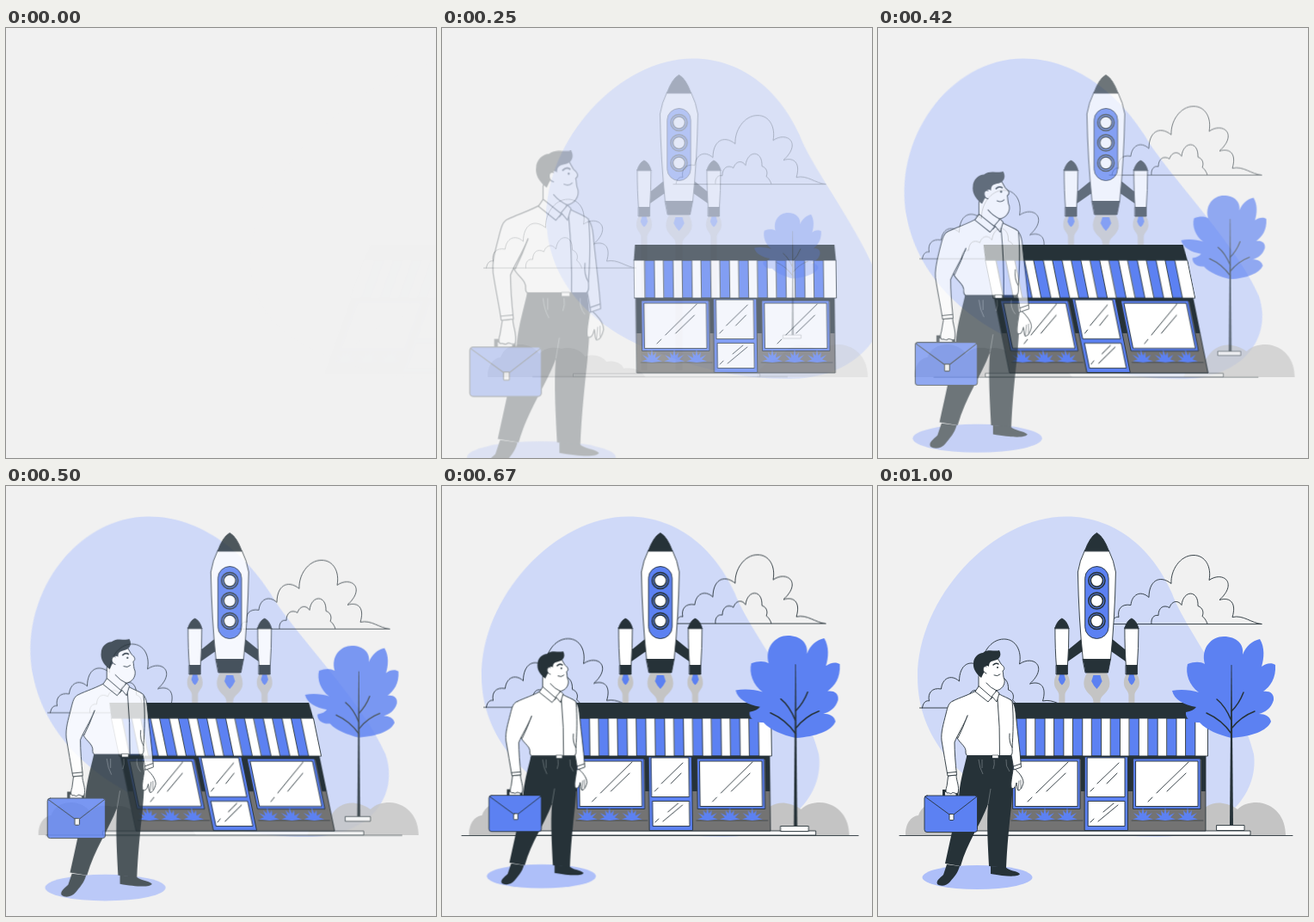
These frames come from a looping animation (500x500 px, 1.04 s). An HTML page:

```html
<!DOCTYPE html>
<html lang="en">
<head>
<meta charset="utf-8">
<title>Shop launch</title>
<style>
  html, body { margin: 0; width: 100%; height: 100%; overflow: hidden; background: #f1f1f1; }
  svg { display: block; width: 100vw; height: 100vh; }

  .in { animation: 1s cubic-bezier(.36, -.01, .5, 1.38) both paused; }
  #blob, #store { animation-name: rush; }
  #bushes, #rocket { animation-name: slide; }
  #clouds { animation-name: rise; }
  #floor, #tree { animation-name: grow; }
  #man { animation-name: shrink; }

  #blob { transform-origin: 241.5px 222px; }
  #store { transform-origin: 266px 327px; }
  #floor { transform-origin: 253.5px 404px; }
  #tree { transform-origin: 402px 288px; }
  #man { transform-origin: 115.5px 329px; }

  @keyframes rush {
    0% { opacity: 0; transform: translate3d(50%, 0, 0) skewX(-20deg); }
    60% { opacity: 1; transform: skewX(10deg); }
    80% { opacity: 1; transform: skewX(-2deg); }
    100% { opacity: 1; transform: translate3d(0, 0, 0); }
  }
  @keyframes slide { from { opacity: 0; transform: translateX(30px); } to { opacity: 1; transform: translateX(0); } }
  @keyframes rise { from { opacity: 0; transform: translateY(30px); } to { opacity: 1; transform: translateY(0); } }
  @keyframes grow { from { opacity: 0; transform: scale(.5); } to { opacity: 1; transform: scale(1); } }
  @keyframes shrink { from { opacity: 0; transform: scale(1.5); } to { opacity: 1; transform: scale(1); } }

  .d { fill: #263238; }
  .b { fill: #5c81f2; }
  .w { fill: #fff; }
  .g { fill: #737373; }
  .s { fill: #c4c4c4; }
  .l { stroke: #263238; stroke-width: .9; stroke-linejoin: round; stroke-linecap: round; }
  .n { fill: none; }
  .thin { stroke-width: .6; }
  .bold { stroke-width: 1.5; }
</style>
</head>
<body>
<svg viewBox="0 0 500 500">
  <defs>
    <g id="cloud" class="n l">
      <path d="M0 0H177M3 0C4 -7 8 -9 11 -8C9 -17 14 -24 25 -22C26 -34 36 -40 46 -31C46 -50 58 -58 72 -47C71 -62 82 -80 98 -80C112 -80 119 -66 116 -51C132 -62 150 -48 128 -28C141 -32 148 -24 143 -8C156 -11 165 -1 177 0"/>
      <path d="M49 0C48 -7 52 -11 57 -10C57 -19 63 -23 70 -19C72 -26 79 -29 84 -22C86 -40 104 -40 103 -21C109 -19 110 -13 108 -9C110 -8 113 -4 114 0"/>
    </g>
    <g id="booster">
      <path class="s" d="M-3.5 398V243C-3.500 238 -9 236 -9 229C-9 223 -7 220 -5 218H5C7 220 9 223 9 229C9 236 3.500 238 3.500 243V398Z"/>
      <path class="b" d="M-2.5 219H2.5L4.2 225Q3 229 0 231.5Q-3 229 -4.2 225Z"/>
      <path class="w l" d="M-8 165H8Q8 190 6.5 209H-6.5Q-8 190 -8 165Z"/>
      <path class="d l" d="M-8 165.5Q-6 157 0 154Q6 157 8 165.5ZM-6.5 208.5H6.5V219H-6.5Z"/>
    </g>
    <g id="port">
      <circle class="l bold" r="9.6" fill="#5478dc"/>
      <circle class="w l bold" r="7"/>
    </g>
    <path id="tuft" class="b" d="M0 15L-12 13.5L-6 11.5L-11 6L-4 9.500L-5 3L-1.500 7L0 0L1.500 7L5 3L4 9.500L11 6L6 11.500L12 13.500Z"/>
    <g id="window">
      <path class="b l" d="M157 317H235V375.500H157Z"/>
      <path class="w l" d="M160 320H232V372.500H160Z"/>
      <path class="n l" d="M174 367L179 362M184 357L221 321M196 355L218 334"/>
      <path class="n l thin" d="M155 389H238"/>
      <use href="#tuft" x="168" y="374"/>
      <use href="#tuft" x="194" y="374"/>
      <use href="#tuft" x="220" y="374"/>
    </g>
  </defs>

  <path id="blob" class="in" fill="#cfd9f8" d="M219 35.500C280 35.500 322 78 342 125C356 165 424 252 437 312C443 358 402 408 325 408C270 408 220 397 160 372C85 340 46 285 46 222C46 130 133 35.500 219 35.500Z"/>

  <g id="bushes" class="in s">
    <path d="M32 406C32 390 40 384 47 383C50 373 60 368 70 368C80 368 88 373 92 379C98 372 108 370 118 373C128 370 140 374 145 382C155 378 166 382 170 388C180 386 188 390 190 396C202 394 212 399 215 406Z"/>
    <path d="M345 406C348 392 360 386 371 385C378 372 390 367 401 369C408 370 414 373 418 376C424 370 432 368 440 368C462 369 474 386 474 406Z"/>
  </g>

  <g id="floor" class="in l">
    <path class="n" d="M25 406.500H482"/>
    <path class="w" d="M98 401H433V406H98Z"/>
  </g>

  <g id="clouds" class="in">
    <use href="#cloud" x="269" y="160.500"/>
    <use href="#cloud" x="48.500" y="258"/>
  </g>

  <g id="rocket" class="in">
    <g transform="translate(254.400 0)">
      <path class="s" d="M-4 398V250C-4 243 -15 240 -15 230C-15 224 -13 219 -10 216H10C13 219 15 224 15 230C15 240 4 243 4 250V398Z"/>
      <path class="b" d="M-4 220H4L6.200 227Q4 232 0 236Q-4 232 -6.200 227Z"/>
      <path class="d" d="M-34 191L-18 178L-15 191L-35 205ZM34 191L18 178L15 191L35 205Z"/>
      <use href="#booster" x="-40.500"/>
      <use href="#booster" x="40.500"/>
      <path class="w l" d="M-14 75H14Q20 87 22 100Q21 155 16 202H-16Q-21 155 -22 100Q-20 87 -14 75Z"/>
      <path class="d l" d="M-14 75.500Q-8 59 0 54.500Q8 59 14 75.500ZM-16 201.500H16L13 217H-13Z"/>
      <rect class="b l" x="-13.700" y="93.500" width="27.400" height="84" rx="13.700"/>
      <use href="#port" y="110"/>
      <use href="#port" y="133.500"/>
      <use href="#port" y="157"/>
    </g>
  </g>

  <g id="store" class="in">
    <path class="g l" d="M150.500 314H381V401H150.500Z"/>
    <path class="d" d="M150.500 313H381V355H376V318H296V355H290V318H241V355H236V318H156V355H150.500Z"/>
    <path class="d" d="M150 252H382L383.500 270H148.500Z"/>
    <path class="w" d="M148.500 270H383.500V314H148.500Z"/>
    <g id="stripes"></g>
    <path class="n l" d="M148.500 270H383.500V314H148.500Z"/>
    <use href="#window"/>
    <use href="#window" x="140"/>
    <path class="b l" d="M240.500 315H290.500V400.500H240.500Z"/>
    <path class="w l" d="M243.500 316H287V361.500H243.500ZM244.500 366.500H287V395.500H244.500Z"/>
    <path class="n l" d="M247 355L251 351M255 346L280 322M266 346L278 334M247 391L251 387M256 390L279 371M262 379L274 369"/>
  </g>

  <g id="tree" class="in">
    <path class="b" d="M411 293C396 289 382 284 374 275C364 276 357 270 358 263C364 262 368 260 370 257C356 255 344 248 342 238C352 236 364 237 373 240C362 232 357 218 360 207C368 204 375 204 380 207C375 188 388 175 402 175C417 175 426 184 424 196C428 186 435 180 444 178C450 188 449 200 446 210C451 206 458 205 462 208C463 224 456 233 448 239C455 238 461 241 460 249C457 259 450 263 443 265C450 265 456 268 457 274C452 285 435 291 411 293Z"/>
    <path class="d" d="M410.600 208H411.400L413 396H409Z"/>
    <path class="n l bold" d="M411 288Q400 272 382 264M411 273Q404 256 394 248M411 262Q420 253 425 240M411 282Q422 268 438 262"/>
    <path class="w l" d="M394 394.500H426V400.500H394Z"/>
  </g>

  <g id="man" class="in">
    <ellipse cx="115.500" cy="455" rx="64" ry="14" fill="#aebff9"/>
    <path class="d" d="M80 440L95 442C93 450 88 455 84 460C80 465 73 466 69 463C67 459 72 456 76 452ZM131 442L148 443C153 448 161 447 165 451C163 455 148 454 131 451Z"/>
    <path class="d" d="M103 315H155C158 335 157 350 155 372C152 400 150 420 149 444L129 442C128 420 126 392 128 370C119 394 104 414 96 442L78 439C84 412 90 385 94 362C95 345 99 332 103 315Z"/>
    <path class="n" stroke="#8a9397" stroke-width=".6" d="M117 318Q118 328 122 335M121 318V328M135 318Q136 324 134 329M149 318Q148 326 153 332M128 370L131 352"/>

    <!-- far arm -->
    <path class="w l" d="M159 329C163 332 169 339 169 345C168 349 166 354 163 354C161 352 162 348 161 345C160 350 158 353 155 351C154 345 156 338 157 330Z"/>
    <path class="n l thin" d="M163 353L164 343M166 351L166 342"/>
    <path class="w l" d="M150 247C156 248 159 253 160 263C162 285 165 305 166.500 327L158 330C156 316 152 300 150 285Z"/>
    <path class="n l" d="M157.500 326L166 323"/>

    <!-- torso -->
    <path class="w l" d="M118 236C106 243 95 246 87 250L92 293C96 300 103 303 102 310Q102 313 104 313.500H154C157 312 156 308 156 304C157 290 158 268 156 250C151 246 146 245 141 242Z"/>
    <path class="d" d="M103 313.500H155V317H103Z"/>
    <path class="w l thin" d="M133 313H140V316.500H133Z"/>
    <path class="n l" d="M139 248Q142 280 141.500 313M104 267Q99 281 93 293M156 304Q152 298 153 288"/>

    <!-- head -->
    <path class="w l" d="M117 222V236L131 248L137 241V238C144 237 148 231 147 225C145 221 146 218 145 215C148 213 147 210 143 207L139 200L121 202Z"/>
    <path class="w l" d="M117 233L113 239L128 251L133 245L138 251L141 241L138 238L132 245Z"/>
    <path class="d" d="M120 223C115 219 110 213 111 206C111 199 117 194 122 194C128 189 136 193 141 191C144 196 142 202 135 203C131 204 129 205 129 210C126 207 122 211 125 216C122 217 122 220 120 223Z"/>
    <path class="w l" d="M126 210C121 208 121 217 126 218"/>
    <path class="n l bold" d="M134 208Q137 205 140 207"/>
    <path class="n l" d="M135 220Q139 222 142 219M126 229Q131 235 138 238"/>
    <circle class="d" cx="139" cy="211" r="1"/>

    <!-- near arm and case -->
    <path class="n" stroke="#263238" stroke-width="3" d="M76.500 361V354.500H92V361"/>
    <path class="w l" d="M82 337L91 336C91 343 95 349 93 357C90 359 88 355 86 357C84 359 83 356 81 357C78 357 79 352 80 349Z"/>
    <path class="w l" d="M87 250C82 252 81 257 79 265C76 277 73 286 74 296C76 310 79 323 81 337L91.500 336C90 322 89 309 89 298C93 288 99 280 104 267"/>
    <path class="n l" d="M80.500 333.500L91 332.500"/>
    <rect class="b l" x="54" y="360" width="61.500" height="42.500" rx="3"/>
    <path class="n l" d="M55 361.500L83 382H88L114.500 361.500"/>
    <rect class="w l" x="83" y="381.500" width="5" height="7" rx=".8"/>
  </g>
</svg>
<script>
  const stripes = document.getElementById('stripes');
  stripes.innerHTML = Array.from({ length: 10 }, (_, i) =>
    `<rect class="b l" x="${161.3 + i * 21.85}" y="270" width="10.9" height="44"/>`).join('');

  // The motion advances in held steps, 24 a second; the first pose lasts two.
  // SLACK absorbs step times rounded to whole hundredths of a second.
  const LOOP = 1040, STEP = 1000 / 24, LEAD = 36, SLACK = 6;
  const moves = document.getAnimations();

  function tick() {
    const now = performance.now() % LOOP;
    const step = Math.min(24, Math.floor((now + SLACK) / STEP));
    const time = (step < 2 ? 0 : step) * STEP + LEAD;
    for (const move of moves) move.currentTime = time;
    requestAnimationFrame(tick);
  }
  tick();
</script>
</body>
</html>
```
